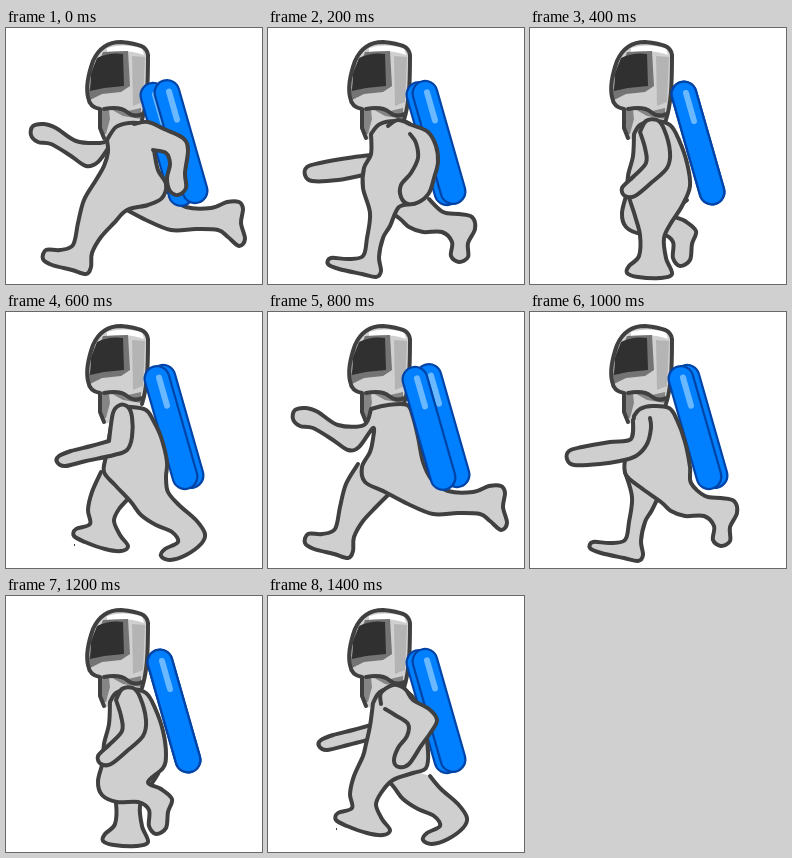
Write an HTML page that moves like this. It is 256x256 px and loops after 1600 ms.

```html
<!DOCTYPE html>
<html lang="en">
<head>
<meta charset="utf-8">
<title>Running astronaut</title>
<style>
html, body { margin: 0; width: 100%; height: 100%; overflow: hidden; background: #fff; }
svg { display: block; width: 100%; height: 100%; }
.pose {
  visibility: hidden;
  animation: show 1600ms step-end infinite;
  animation-delay: calc(var(--i) * 200ms - 1600ms);
}
@keyframes show {
  0% { visibility: visible; }
  12.5%, 100% { visibility: hidden; }
}
.suit { fill: #cfcfcf; stroke: #404040; stroke-width: 4; stroke-linejoin: round; stroke-linecap: round; }
.tank { fill: none; stroke-linecap: round; }
</style>
</head>
<body>
<svg viewBox="0 0 256 256">
  <defs>
    <g id="head">
      <path fill="#d0d0d0" d="M86 78 81 66 83 48 88 31 98 18 115 14 135 17 142 25 142 50 138 78 136 98 99 112 95 102 93 82Z"/>
      <path fill="#fff" d="M101 20Q116 15 136 20L138 27Q122 21 101 24Z"/>
      <path fill="#b4b4b4" d="M126 28 139 29 137 74 127 78Z"/>
      <path fill="#747474" d="M97 24 122 23 124 58 115 64 96 66 84 72 83 62Z"/>
      <path fill="#303030" d="M91 30Q103 24 117 26L118 58 98 60 84 63 85 45Z"/>
      <path fill="#858585" d="M92 80 103 82 104 91 100 106 96 106ZM101 79 122 83 135 80 135 91 117 88Z"/>
      <path fill="none" stroke="#404040" stroke-width="4" stroke-linejoin="round" stroke-linecap="round"
        d="M136 92C141 76 142 58 142 27C141 18 133 16 115 14C98 14 91 24 87 33C82 47 80 60 82 69C83 76 87 80 94 81L94 100 98 110M98 81Q114 78 121 84T136 86"/>
    </g>
  </defs>
</svg>
<script>
const svg = document.querySelector('svg');

// Smooth open curve through "x,y x,y ..." points
function curve(text) {
  const p = text.trim().split(/\s+/).map(s => s.split(',').map(Number));
  const at = i => p[Math.max(0, Math.min(p.length - 1, i))];
  const ctrl = (i, s) => at(i).map((v, k) => (v + s * (at(i + 1)[k] - at(i - 1)[k]) / 6).toFixed(1));
  let d = 'M' + p[0];
  for (let i = 1; i < p.length; i++) d += `C${ctrl(i - 1, 1)} ${ctrl(i, -1)} ${p[i]}`;
  return d;
}
const suit = text => `<path class="suit" d="${curve(text)}"/>`;

function tank(x) {
  const y = 66 - (x - 154) * 0.2;
  const line = (x1, y1, x2, y2, color, w) =>
    `<path class="tank" d="M${x1} ${y1}L${x2} ${y2}" stroke="${color}" stroke-width="${w}"/>`;
  return line(x, y, x + 28, y + 98, '#0044a8', 27) +
    line(x, y, x + 28, y + 98, '#0080ff', 22.5) +
    line(x + 2, y - 1, x + 10, y + 27, '#6ab8ff', 6);
}
const pack = (back, front) => tank(back) + tank(front);

// Stages of the stride: legs are drawn from the front of the hip to the seat
const legs = {
  wide: {
    fore: '90,152 78,172 72,195 67,217 54,222 40,222 37,231 46,237 66,242 80,246 85,239 86,225 95,209 108,195 121,182',
    hind: '97,170 117,180 140,192 165,202 190,201 212,202 222,209 233,218 239,211 235,195 237,181 233,174 221,174 205,180 180,179 164,168'
  },
  land: {
    fore: '95,160 102,185 99,210 95,228 80,231 63,230 60,236 71,241 94,246 108,249 113,243 111,229 115,210 122,198 131,179',
    hind: '96,163 110,175 131,190 141,199 155,204 174,204 184,214 183,228 191,234 200,229 200,215 207,201 204,189 191,186 175,184 161,171'
  },
  pass: {
    fore: '98,165 105,188 110,207 109,228 99,238 97,245 108,249 130,250 142,246 136,230 134,210 141,195 152,178',
    hind: '97,165 92,185 96,199 111,206 132,206 143,214 143,230 150,238 160,232 162,216 166,203 155,193 142,186 157,172'
  },
  push: {
    fore: '95,160 86,180 82,198 84,212 70,217 68,224 79,230 99,237 115,239 122,234 114,223 108,209 113,197 125,184',
    hind: '98,160 109,173 125,190 135,203 150,213 166,220 172,230 159,237 155,244 164,248 180,243 195,232 199,222 190,208 173,193 162,180'
  }
};

const reach = {
  wide: '102,112 94,115 70,113 50,100 38,96 27,98 25,107 32,114 45,116 65,128 80,138 92,134 103,119',
  land: '103,127 80,130 52,135 39,139 37,147 44,153 70,152 95,147 104,144',
  push: '103,129 85,134 65,139 53,144 51,150 59,154 80,149 103,143'
};

const stance = [
  { // near leg ahead, near arm behind
    step: 'wide', ahead: true, far: reach.wide, tanks: [147, 161],
    chest: '101,112 102,124 98,138', seat: '142,177 156,170 160,156 152,142 148,122 146,104 135,96 123,95 110,99 101,112',
    arm: '128,96 142,94 158,101 177,110 182,122 179,145 180,160 172,167 164,163 161,150 164,136 160,125 147,122'
  },
  {
    step: 'land', ahead: true, far: reach.land, tanks: [151, 157],
    chest: '103,106 103,126 96,140', seat: '147,175 159,164 163,150 157,125 144,98 130,93 112,96 103,106',
    arm: '120,98 130,92 144,97 160,104 168,118 170,134 166,150 161,165 151,174 140,176 133,169 133,157 143,145 150,130 148,115 142,106'
  },
  {
    step: 'pass', ahead: true, tanks: [154, 154],
    chest: '104,106 103,128 98,148', seat: '160,158 157,135 149,112 140,97 124,93 110,97 104,106',
    arm: '110,104 116,93 127,92 134,101 140,124 137,140 121,155 105,168 95,168 92,160 103,149 116,135 115,120 110,104'
  },
  {
    step: 'push', ahead: false, tanks: [157, 151],
    chest: '107,103 103,126 100,144', seat: '160,165 161,150 155,125 147,108 140,98 125,95 112,96 107,103',
    arm: '103,129 107,101 114,93 122,95 126,105 126,125 121,138 108,143 80,149 59,154 51,150 53,144 65,139 85,134 103,129'
  },
  {
    step: 'wide', ahead: false, tanks: [161, 147], packOver: true,
    chest: '103,97 96,113 70,113 50,100 38,96 27,98 25,107 32,114 45,116 65,128 80,138 91,135 105,116 105,127 102,140 94,155',
    seat: '155,150 150,125 145,105 139,93 120,93 103,97'
  },
  {
    step: 'land', ahead: false, tanks: [157, 151],
    chest: '104,104 102,126 95,148', seat: '160,155 155,130 147,108 139,96 122,94 110,97 104,104',
    arm: '120,106 121,116 117,132 106,144 90,149 70,152 44,153 37,147 39,139 52,135 80,130 101,127 103,108'
  },
  {
    step: 'pass', ahead: false, tanks: [154, 154],
    chest: '104,106 103,128 98,148', seat: '160,158 157,135 149,112 140,97 124,93 110,97 104,106',
    arm: '110,104 116,93 127,92 134,101 140,124 137,140 121,155 105,168 95,168 92,160 103,149 116,135 115,120 110,104'
  },
  {
    step: 'push', ahead: true, far: reach.push, tanks: [151, 157],
    chest: '105,107 102,130 98,148', seat: '145,177 158,172 160,155 155,125 144,100 128,92 112,96 105,107',
    arm: '113,108 113,97 125,89 137,93 145,104 161,113 169,124 163,136 153,150 141,168 131,171 126,165 130,152 139,140 140,128 127,119 117,113'
  }
];

function draw(s, i) {
  const { fore, hind } = legs[s.step];
  const near = s.ahead ? fore : hind;
  const far = s.ahead ? hind : fore;
  const gear = pack(...s.tanks);
  const body = suit(`${s.chest} ${near} ${s.seat}`);
  const speck = s.step === 'push' ? '<path d="M68 233h1" stroke="#404040" stroke-width="2"/>' : '';
  return `<g class="pose" style="--i:${i}">` +
    suit(far) + (s.far ? suit(s.far) : '') + '<use href="#head"/>' +
    (s.packOver ? body + gear : gear + body) +
    (s.arm ? suit(s.arm) : '') + speck + '</g>';
}

svg.insertAdjacentHTML('beforeend', stance.map(draw).join(''));
</script>
</body>
</html>
```
